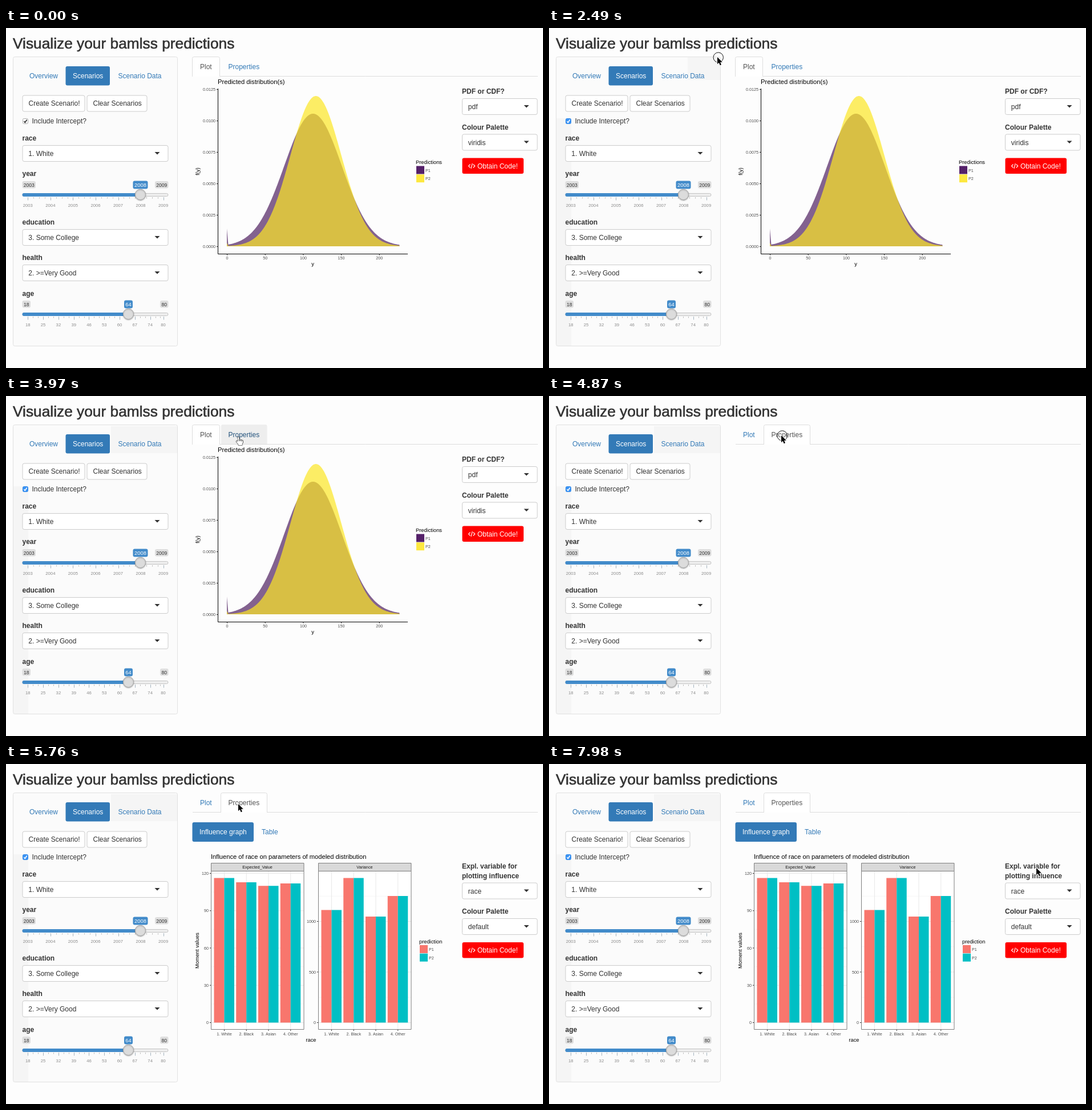
An HTML page with a canvas that plays this animation: 941x595 px, repeating every 8 s.

```html
<!DOCTYPE html>
<html lang="en">
<head>
<meta charset="utf-8">
<title>Prediction viewer</title>
<style>
html, body { margin: 0; height: 100%; overflow: hidden; background: #fdfdfd; }
canvas { display: block; }
</style>
</head>
<body>
<canvas id="stage" width="941" height="595"></canvas>
<script>
const ctx = document.getElementById('stage').getContext('2d');
const FONT = '"Liberation Sans", Arial, sans-serif';
const PAGE = '#fdfdfd', INK = '#333', LINK = '#337ab7', LINK_HOVER = '#23527c', LINE = '#ddd';
const LOOP = 8000;

// Pointer steps: time, x, y
const POINTER = [
  [1470, 246, 1], [1620, 285, 34], [1760, 345, 76], [1910, 373, 91], [2060, 322, 62], [2200, 295, 51],
  [2640, 291, 55], [2790, 272, 68], [2930, 249, 80], [3080, 240, 84],
  [3530, 268, 83], [3680, 330, 78], [3820, 389, 73], [3970, 407, 71], [4870, 407, 69], [5010, 407, 70],
  [7100, 432, 76], [7250, 520, 99], [7390, 655, 132], [7540, 790, 160], [7690, 879, 173],
  [7830, 866, 179], [7980, 854, 182]
];

function text(str, x, y, { size = 12, color = INK, align = 'left', bold = false } = {}) {
  ctx.font = `${bold ? 'bold ' : ''}${size}px ${FONT}`;
  ctx.fillStyle = color;
  ctx.textAlign = align;
  ctx.fillText(str, x, y);
}

function sideText(str, x, y, size) {
  ctx.save();
  ctx.translate(x, y);
  ctx.rotate(-Math.PI / 2);
  text(str, 0, 0, { size, color: '#000', align: 'center' });
  ctx.restore();
}

function box(x, y, w, h, fill, stroke, r = 0) {
  ctx.beginPath();
  ctx.roundRect(x, y, w, h, r);
  if (fill) { ctx.fillStyle = fill; ctx.fill(); }
  if (stroke) { ctx.strokeStyle = stroke; ctx.lineWidth = 1; ctx.stroke(); }
}

function line(color, width, ...points) {
  ctx.beginPath();
  for (let i = 0; i < points.length; i += 2) ctx.lineTo(points[i], points[i + 1]);
  ctx.strokeStyle = color;
  ctx.lineWidth = width;
  ctx.stroke();
}

const label = (str, x, y) => text(str, x, y, { bold: true });

function select(str, x, y, w) {
  box(x + .5, y + .5, w - 1, 28, '#fff', '#ccc', 3);
  text(str, x + 10.8, y + 19);
  const cx = x + w - 19.5, cy = y + 12;
  ctx.beginPath();
  ctx.moveTo(cx - 4.5, cy);
  ctx.lineTo(cx + 4.5, cy);
  ctx.lineTo(cx, cy + 4.5);
  ctx.fillStyle = INK;
  ctx.fill();
}

function slider(y, min, max, value, step, minors, knob) {
  const badge = (v, x, w, active) => {
    box(x, y - 24 - (active ? .5 : 0), w, active ? 14 : 12.5, active ? '#428bca' : '#dedede', null, 3);
    text(v, x + w / 2, y - 14.3, { size: active ? 9.4 : 8.6, color: active ? '#fff' : INK, align: 'center' });
  };
  const digits = String(min).length;
  const small = digits > 2 ? 23.5 : 14.5, large = digits > 2 ? 26 : 15;
  badge(min, 28.5, small);
  badge(max, 284.5 - small, small);
  badge(value, knob - large / 2, large, true);

  box(29, y - 2.5, 255, 5, '#eee', '#c4c4c4', 2.5);
  box(28.5, y - 3, knob - 28.5, 6, '#428bca', null, 3);
  const at = v => 38.3 + (v - min) / (max - min) * 237.3;
  for (let v = min; v <= max; v += step / (minors + 1)) {
    const x = Math.round(at(v)) + .5;
    line('#bbb', 1, x, y + 4, x, y + 6.5);
  }
  const mark = v => {
    const x = Math.round(at(v)) + .5;
    line('#a5b3be', 1, x, y + 4, x, y + 9.5);
    text(v, at(v), y + 21.4, { size: 7.7, color: '#8d8d8d', align: 'center' });
  };
  for (let v = min; v < max; v += step) mark(v);
  mark(max);

  ctx.save();
  ctx.shadowColor = 'rgba(0,0,0,.25)';
  ctx.shadowBlur = 2;
  ctx.shadowOffsetY = 1;
  box(knob - 9.2, y - 9.7, 18.4, 18.4, '#dcdcdc', '#aaa', 9.2);
  ctx.restore();
}

function checkbox(focused) {
  box(29.5, 158.5, 9, 9, focused ? '#3b94f5' : '#fff', focused ? '#2f86e8' : '#aaa', 2);
  line(focused ? '#fff' : '#222', 1.5, 31.5, 163.3, 33.3, 165.4, 36.6, 160.5);
}

function sidebar(t, overData) {
  text('Visualize your bamlss predictions', 12, 36, { size: 26.3 });
  ctx.strokeStyle = INK;
  ctx.lineWidth = .6;
  ctx.strokeText('Visualize your bamlss predictions', 12, 36);

  box(12.5, 50.5, 288, 506, '#fbfbfb', null, 3);
  const shade = '#f5f5f5';
  if (t >= 1170) box(13, 158, 26, 398, shade);
  if (t >= 2930) box(184, 53, 117, 47, shade);
  else if (t >= 1620) box(243, 51, 58, 40, shade);
  box(12.5, 50.5, 288, 506, null, '#e1e1e1', 3);

  text('Overview', 41, 88, { color: LINK });
  box(104.5, 67, 77.5, 33.5, LINK, null, 3);
  text('Scenarios', 117, 88, { color: '#fff' });
  if (overData) box(184, 67, 100, 33.5, '#eee', null, 3);
  text('Scenario Data', 196.5, 88, { color: overData ? LINK_HOVER : LINK });

  box(29, 118, 109, 28, '#fff', '#ccc', 3);
  text('Create Scenario!', 39.5, 136);
  box(142, 118, 105, 28, '#fff', '#ccc', 3);
  text('Clear Scenarios', 152.5, 136);
  checkbox(t >= 1170);
  text('Include Intercept?', 45.5, 167);

  label('race', 28.5, 197);
  select('1. White', 28.5, 205, 256);
  label('year', 28.5, 259);
  slider(292, 2003, 2009, 2008, 1, 3, 235.5);
  label('education', 28.5, 343.5);
  select('3. Some College', 28.5, 352, 256);
  label('health', 28.5, 406);
  select('2. >=Very Good', 28.5, 414, 256);
  label('age', 28.5, 468.5);
  slider(501, 18, 80, 64, 7, 2, 214.5);
}

function tabs(properties, overProperties) {
  line(LINE, 1, 327, 84.5, 932, 84.5);
  if (overProperties) box(377, 50, 80.5, 34, '#eee', null, [3, 3, 0, 0]);
  const x = properties ? 376.5 : 326.5, w = properties ? 81 : 48;
  box(x, 50.5, w, 36, '#fff', LINE, [3, 3, 0, 0]);
  box(x - 1, 85, w + 2, 3, PAGE);
  text('Plot', 340, 72, { color: properties ? LINK : '#555' });
  text('Properties', 389.5, 72, { color: properties ? '#555' : overProperties ? LINK_HOVER : LINK });
}

function codeButton(y) {
  box(799.5, y, 107.5, 27.5, '#f00', null, 3);
  line('#fff', 1.1, 813.5, y + 11, 810.5, y + 14, 813.5, y + 17);
  line('#fff', 1.1, 818.7, y + 11, 821.7, y + 14, 818.7, y + 17);
  line('#fff', 1.1, 817.2, y + 9.5, 815, y + 18.5);
  text('Obtain Code!', 826, y + 18, { color: '#fff' });
}

const small = (str, x, y, align) => text(str, x, y, { size: 7.2, color: '#4d4d4d', align });

function density(mean, sd, height, spike, fill) {
  ctx.beginPath();
  ctx.moveTo(387, 382);
  ctx.lineTo(387, 382 - spike);
  for (let x = 389.5; x < 690; x++) {
    ctx.lineTo(x, 382 - height * Math.exp(-(((x - mean) / sd) ** 2) / 2));
  }
  ctx.lineTo(689.5, 382);
  ctx.fillStyle = fill;
  ctx.fill();
}

function legend(title, x, y, colors) {
  text(title, x, y, { size: 9.3, color: '#000' });
  colors.forEach((color, i) => {
    box(x + 1, y + 3.5 + 14.7 * i, 14, 14, color);
    small('P' + (i + 1), x + 17, y + 13.5 + 14.6 * i);
  });
}

function plotPane() {
  text('Predicted distribution(s)', 371, 98, { size: 11.2, color: '#000' });
  density(538, 50.5, 232, 31, '#83628f');
  density(543, 44.5, 263, 6, 'rgba(253,231,37,.7)');
  line('#000', 1, 371.5, 106, 371.5, 395.5, 704, 395.5);
  for (let i = 0; i <= 5; i++) {
    const y = 382 - 55 * i;
    small((i * .0025).toFixed(4), 367, y + 2.6, 'right');
    line('#333', 1, 369, y + .5, 371, y + .5);
  }
  for (let i = 0; i <= 4; i++) {
    const x = 387.5 + 66.7 * i;
    small(i * 50, x, 405, 'center');
    line('#333', 1, x, 396, x, 398);
  }
  text('y', 537.5, 415.5, { size: 9.3, color: '#000', align: 'center' });
  sideText('f(y)', 338.5, 251, 9.3);
  legend('Predictions', 718, 238, ['#542069', '#fde840']);

  label('PDF or CDF?', 799, 115);
  select('pdf', 799, 123, 132.5);
  label('Colour Palette', 799, 177.5);
  select('viridis', 799, 185.5, 132.5);
  codeButton(227.5);
}

function facet(x, title, tops, step, gap, count) {
  box(x, 187.5, 162.5, 277, '#fff');
  for (let i = 0; i < 2 * count; i++) {
    const y = 452.5 - i * gap / 2;
    if (y > 188) line(i % 2 ? '#f5f5f5' : '#e8e8e8', 1, x, y, x + 162.5, y);
  }
  tops.forEach((top, i) => {
    const left = x + 5 + 38.75 * i, mid = left + 18;
    line('#e8e8e8', 1, mid, 188, mid, 464);
    box(left, top, 18, 452.5 - top, '#f8766d');
    box(mid, top, 17.5, 452.5 - top, '#00bfc4');
    line('#333', 1, mid, 465, mid, 467);
    small(['1. White', '2. Black', '3. Asian', '4. Other'][i], mid, 475, 'center');
  });
  for (let i = 0; i < count; i++) {
    const y = 452.5 - i * gap;
    line('#333', 1, x - 2.5, y, x, y);
    small(i * step, x - 4.5, y + 2.6, 'right');
  }
  box(x, 187.5, 162.5, 277, null, '#7f7f7f');
  box(x, 173.5, 162.5, 14, '#d9d9d9', '#7f7f7f');
  text(title, x + 81, 183.3, { size: 7.3, color: '#1a1a1a', align: 'center' });
}

function influenceGraph() {
  text('Influence of race on parameters of modeled distribution', 359, 165.5, { size: 11.15, color: '#000' });
  facet(359.5, 'Expected_Value', [199.5, 207, 213.3, 209], 30, 65.25, 5);
  facet(547.5, 'Variance', [255.5, 199.5, 267, 231], 500, 88.5, 3);
  text('race', 534.5, 486, { size: 9.3, color: '#000', align: 'center' });
  sideText('Moment values', 338, 326.5, 9.3);
  legend('prediction', 724, 313.5, ['#f8766d', '#00bfc4']);
}

function propertiesPane() {
  box(326.5, 102, 107.5, 34, LINK, null, 3);
  text('Influence graph', 339, 123, { color: '#fff' });
  text('Table', 448, 123, { color: LINK });
  label('Expl. variable for', 799, 182.5);
  label('plotting influence', 799, 199.5);
  select('race', 799, 207.5, 132.5);
  label('Colour Palette', 799, 262);
  select('default', 799, 270, 132.5);
  codeButton(312);
}

const ARROW = new Path2D('M0 0V12.2L2.8 9.6L4.7 14.2L6.9 13.2L5 8.8H8.8Z');
const HAND = new Path2D('M-.8 9V1.4Q.3-.4 1.6 1.2V5.4Q3 4.4 3.9 5.8Q5.4 5 6.2 6.4Q8.2 6 8.2 8.2V10.5L6.8 13V15H.2V13.4L-3.6 9.2Q-3.8 7.2-2 7.7Z');

function pointer(x, y, hand, pressed) {
  if (pressed) {
    ctx.beginPath();
    ctx.arc(x + 1.7, y + .5, 8.7, 0, 2 * Math.PI);
    ctx.strokeStyle = '#111';
    ctx.lineWidth = 1;
    ctx.stroke();
  }
  ctx.save();
  ctx.translate(x, y);
  ctx.lineJoin = 'round';
  ctx.strokeStyle = hand ? '#000' : '#fff';
  ctx.lineWidth = hand ? 1.1 : 1.8;
  ctx.fillStyle = hand ? '#fff' : '#000';
  ctx.stroke(hand ? HAND : ARROW);
  ctx.fill(hand ? HAND : ARROW);
  if (hand) {
    line('#000', .8, 1.6, 5, 1.6, 8);
    line('#000', .8, 3.9, 6, 3.9, 8);
    line('#000', .8, 6.1, 6.5, 6.1, 8.5);
  }
  ctx.restore();
}

function draw(t) {
  const step = POINTER.findLast(p => p[0] <= t);
  const [, x, y] = step || [0, -99, -99];
  const within = (left, top, right, bottom) => x > left && x < right && y > top && y < bottom;
  const properties = t >= 4870;
  const overData = within(184, 67, 284, 100);
  const overProperties = !properties && within(377, 50, 457, 85);

  box(0, 0, 941, 595, PAGE);
  sidebar(t, overData);
  tabs(properties, overProperties);
  if (!properties) plotPane();
  if (t >= 5010) propertiesPane();
  if (t >= 5760) influenceGraph();
  const pressed = (t >= 2490 && t < 2640) || (t >= 4870 && t < 5010);
  if (step) pointer(x, y, overData || overProperties, pressed);
}

function frame() {
  draw(performance.now() % LOOP);
  requestAnimationFrame(frame);
}
frame();
</script>
</body>
</html>
```
